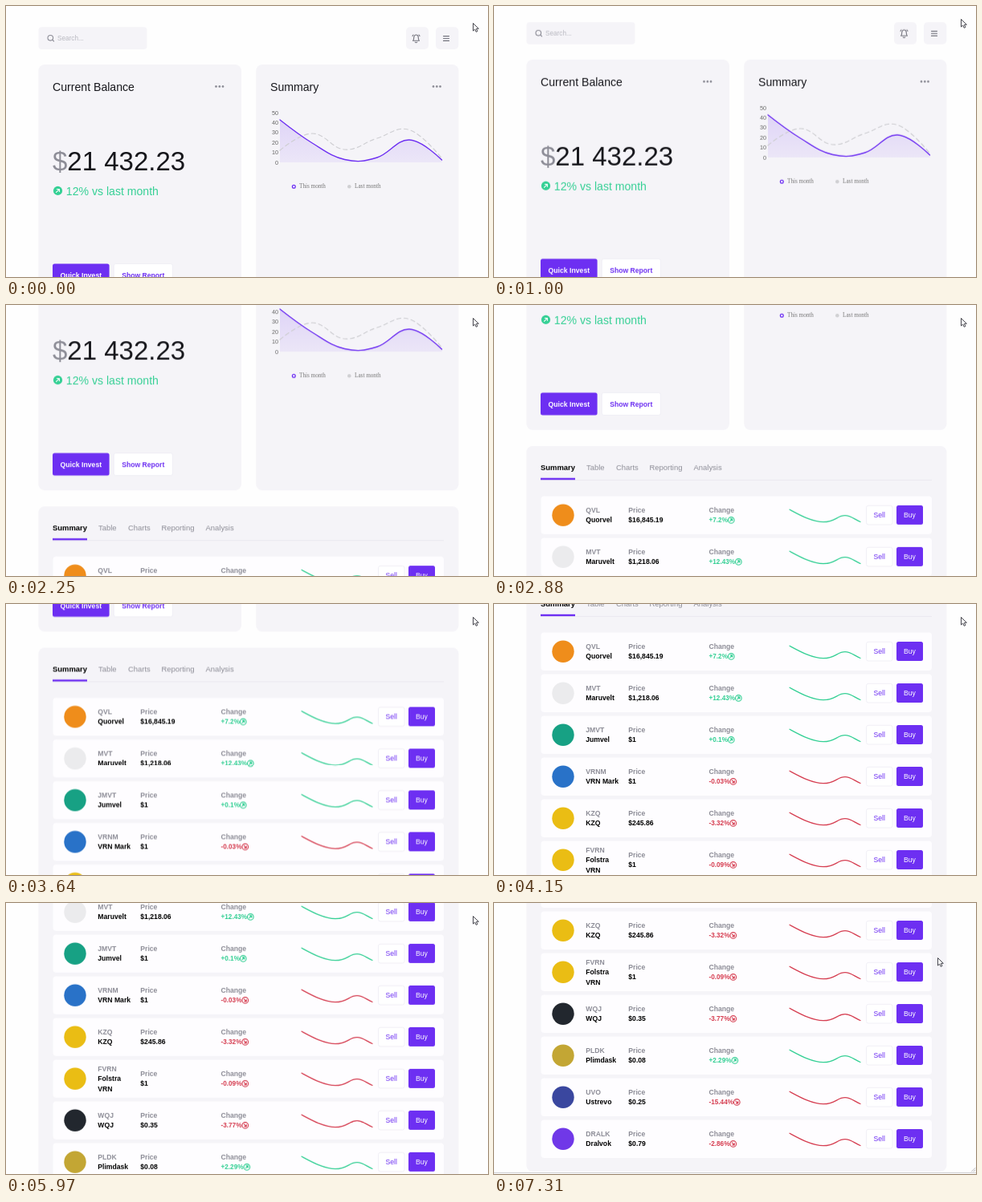
An HTML page that plays this animation: 600 by 338 pixels, repeating every 7.34 s.

```html
<!DOCTYPE html>
<html lang="en">
<head>
<meta charset="utf-8">
<title>Portfolio dashboard</title>
<style>
  html, body { margin: 0; width: 100%; height: 100%; overflow: hidden; background: #fefefe; }
  svg { display: block; width: 600px; height: 338px; }
  text { font-family: "Liberation Sans", Arial, sans-serif; white-space: pre; }
  .b { font-weight: 700; }
  .serif { font-family: "Liberation Serif", "Times New Roman", serif; }
  .mid { text-anchor: middle; }
  .end { text-anchor: end; }
  .line { fill: none; stroke-linecap: round; stroke-linejoin: round; }

  #page { animation: scroll 7340ms linear infinite; }
  #cursor { animation: point 7340ms linear infinite; }

  @keyframes scroll {
    0% { transform: translateY(0); }
    6.27% { transform: translateY(0); animation-timing-function: ease-in; }
    16.08% { transform: translateY(-10px); }
    17.03% { transform: translateY(-10px); }
    23.16% { transform: translateY(-71px); }
    39.24% { transform: translateY(-212px); }
    56.54% { transform: translateY(-415px); }
    57.36% { transform: translateY(-415px); }
    66.49% { transform: translateY(-458px); }
    78.88% { transform: translateY(-508px); }
    80.11% { transform: translateY(-508px); }
    81.34% { transform: translateY(-515px); animation-timing-function: cubic-bezier(.3, .3, .6, 1); }
    90.05%, 100% { transform: translateY(-648px); }
  }
  @keyframes point {
    0%, 6.27% { transform: translate(581px, 21px); }
    11%, 90.46% { transform: translate(581px, 16px); animation-timing-function: ease-in-out; }
    99.59%, 100% { transform: translate(552px, 68px); }
  }
</style>
</head>
<body>
<svg viewBox="0 0 600 338">
  <linearGradient id="fade" x2="0" y2="1">
    <stop stop-color="#6d2ff2" stop-opacity=".16"/>
    <stop offset="1" stop-color="#6d2ff2" stop-opacity=".07"/>
  </linearGradient>
  <g id="page"></g>
  <path id="cursor" d="M.5 .5V10L2.7 8L4.2 11.3L5.9 10.5L4.4 7.3H7.3Z" fill="#fff" stroke="#33333b" stroke-width=".9"/>
</svg>
<script>
const PURPLE = '#6d2ff2', GREEN = '#35d095', RED = '#d63f52';
const INK = '#17171c', GRAY = '#8d8d97', CARD = '#f5f4f8', EDGE = '#eeecf4';
const page = document.getElementById('page');

function el(tag, attrs, content = '') {
  const node = document.createElementNS('http://www.w3.org/2000/svg', tag);
  for (const key in attrs) node.setAttribute(key, attrs[key]);
  node.textContent = content;
  return page.appendChild(node);
}
const text = (x, y, size, fill, content, cls = '') =>
  el('text', { x, y, 'font-size': size, fill, class: cls }, content);
const rect = (x, y, width, height, rx, fill, stroke = 'none') =>
  el('rect', { x, y, width, height, rx, fill, stroke, 'stroke-width': .8 });
const circle = (cx, cy, r, fill, stroke = 'none', width = 1) =>
  el('circle', { cx, cy, r, fill, stroke, 'stroke-width': width });
const line = (d, stroke, width = 1, dash = 'none') =>
  el('path', { d, stroke, 'stroke-width': width, 'stroke-dasharray': dash, class: 'line' });

function button(x, y, w, h, label, size, primary, cls = '') {
  rect(x, y, w, h, 2.5, primary ? PURPLE : '#fff', primary ? 'none' : EDGE);
  text(x + w / 2, y + h / 2 + 3, size, primary ? '#fff' : PURPLE, label, 'mid ' + cls);
}
function card(x, y, w, h, title) {
  rect(x, y, w, h, 8, CARD);
  if (!title) return;
  text(x + 17.8, y + 32.7, 14.1, INK, title);
  for (const dx of [31.5, 27.2, 23]) circle(x + w - dx, y + 27.4, 1.35, GRAY);
}

// Smooth curve through evenly spaced points
function curve(ys, x0, dx) {
  const slope = i => (ys[Math.min(i + 1, ys.length - 1)] - ys[Math.max(i - 1, 0)]) * .2;
  let d = `M${x0} ${ys[0]}`;
  for (let i = 1; i < ys.length; i++) {
    const x = x0 + i * dx, a = i === 1 ? 0 : .4, b = i === ys.length - 1 ? 0 : .4;
    d += `C${x - dx + a * dx} ${ys[i - 1] + (a && slope(i - 1))} ${x - b * dx} ${ys[i] - (b && slope(i))} ${x} ${ys[i]}`;
  }
  return d;
}

function header() {
  rect(40.5, 26.3, 135, 27.7, 4, CARD);
  circle(55.3, 39.8, 3.3, 'none', GRAY, 1.1);
  line('M57.8 42.3L59.6 44', GRAY, 1.1);
  text(64, 43, 8.2, '#b9b9c1', 'Search...');
  rect(498, 26.3, 28, 27.7, 5, CARD);
  rect(535, 26.3, 28.3, 27.7, 5, CARD);
  line('M506.5 43.3H514.5C513 41.8 513.4 40 513.2 38.6C512.8 35.2 508.2 35.2 507.8 38.6C507.6 40 508 41.8 506.5 43.3ZM509.3 45.2Q510.5 46.3 511.7 45.2M506 37.4L507 36M515 37.4L514 36', '#74747e', 1.1);
  line('M544.5 37.6H551.5M544.5 40.5H551.5M544.5 43.4H551.5', '#74747e', 1.1);
}

function balance() {
  card(40.3, 73, 252.7, 295, 'Current Balance');
  text(58, 204.7, 33, GRAY, '$');
  text(76.3, 204.7, 33, INK, '21 432.23');
  circle(64.5, 230.4, 5.6, GREEN);
  line('M62.5 232.4L66.3 228.6M63.4 228.5H66.4V231.5', '#fff', 1.1);
  text(74.8, 235.7, 14.1, GREEN, '12% vs last month');
  button(58, 321.5, 70.6, 28, 'Quick Invest', 8.7, true, 'b');
  button(134.2, 321.5, 73.2, 28, 'Show Report', 8.6, false, 'b');
}

function summary() {
  card(311.2, 73, 252.3, 295, 'Summary');
  for (let i = 0; i <= 5; i++) text(339, 197.5 - i * 12.4, 7.2, '#666', i * 10, 'end');
  const now = curve([142, 171, 191.5, 189, 167, 192], 341, 40.3);
  const before = curve([180, 159, 179, 165, 154.5, 190], 341, 40.3);
  el('path', { d: now + 'V195H341Z', fill: 'url(#fade)' });
  line(before, '#cfcfd3', 1.2, '5 4');
  line(now, PURPLE, 1.35);
  circle(358.3, 225.2, 1.9, '#fff', PURPLE, 1.3);
  text(365, 227.3, 7.2, '#777', 'This month', 'serif');
  circle(427.3, 225.2, 2.3, '#d0d0d3');
  text(434, 227.3, 7.2, '#777', 'Last month', 'serif');
}

function tabs() {
  card(40.3, 388, 523.2, 595);
  const names = [['Summary', 58], ['Table', 115], ['Charts', 152], ['Reporting', 193.5], ['Analysis', 248.5]];
  names.forEach(([name, x], i) => text(x, 417.6, 9.45, i ? GRAY : '#000', name, i ? '' : 'b'));
  rect(58, 430, 487, .8, 0, '#e9e7ef');
  rect(58, 427.8, 43, 2.4, 0, PURPLE);
}

function row([code, name, price, change, color], i) {
  const c = 474 + i * 52, up = change[0] === '+', tone = up ? GREEN : RED;
  const words = name.split('\n'), top = c - 3 - (words.length - 1) * 6;
  rect(58.5, c - 23.5, 486.5, 47.4, 4, '#fefdff');
  circle(86, c + .2, 13.7, color);
  text(114.3, top, 8.65, GRAY, code, 'b');
  words.forEach((word, n) => text(114.3, top + 12.3 * (n + 1), 8.65, '#000', word, 'b'));
  text(167.3, c - 3, 8.65, GRAY, 'Price', 'b');
  text(167.3, c + 9.3, 8.65, '#000', price, 'b');
  text(267.5, c - 3, 8.65, GRAY, 'Change', 'b');
  const label = text(267.5, c + 9.3, 8.2, tone, change, 'b');
  const x = 267.5 + label.getComputedTextLength() + 4.3, y = c + 6.4;
  circle(x, y, 3.8, 'none', tone, 1.1);
  line(up
    ? `M${x - 1.5} ${y + 1.5}l3 -3m-2.4 0h2.4v2.4`
    : `M${x - 1.5} ${y - 1.5}l3 3m-2.4 0h2.4v-2.4`, tone, 1.1);
  line(`M368 ${c - 6.7}c13 7 28 15.4 42 15.4c15 0 17 -8 27 -8c7 0 11 4.3 19 7.8`, tone, 1.3);
  button(463.5, c - 11.7, 32.5, 23.7, 'Sell', 8.6, false);
  button(501, c - 12, 33, 24, 'Buy', 8.6, true);
}

const coins = [
  ['QVL', 'Quorvel', '$16,845.19', '+7.2%', '#ef8d1b'],
  ['MVT', 'Maruvelt', '$1,218.06', '+12.43%', '#ebebed'],
  ['JMVT', 'Jumvel', '$1', '+0.1%', '#17a184'],
  ['VRNM', 'VRN Mark', '$1', '-0.03%', '#2972c8'],
  ['KZQ', 'KZQ', '$245.86', '-3.32%', '#eabd14'],
  ['FVRN', 'Folstra\nVRN', '$1', '-0.09%', '#eabd14'],
  ['WQJ', 'WQJ', '$0.35', '-3.77%', '#22272e'],
  ['PLDK', 'Plimdask', '$0.08', '+2.29%', '#c3a634'],
  ['UVO', 'Ustrevo', '$0.25', '-15.44%', '#3a479f'],
  ['DRALK', 'Dralvok', '$0.79', '-2.86%', '#7038e8'],
];

header();
balance();
summary();
tabs();
coins.forEach(row);
rect(0, 984, 600, 1, 0, '#cfcfd2');
line('M594.5 983L599 978.5M597 983L599 981', '#a5a5aa', .8);
</script>
</body>
</html>
```
